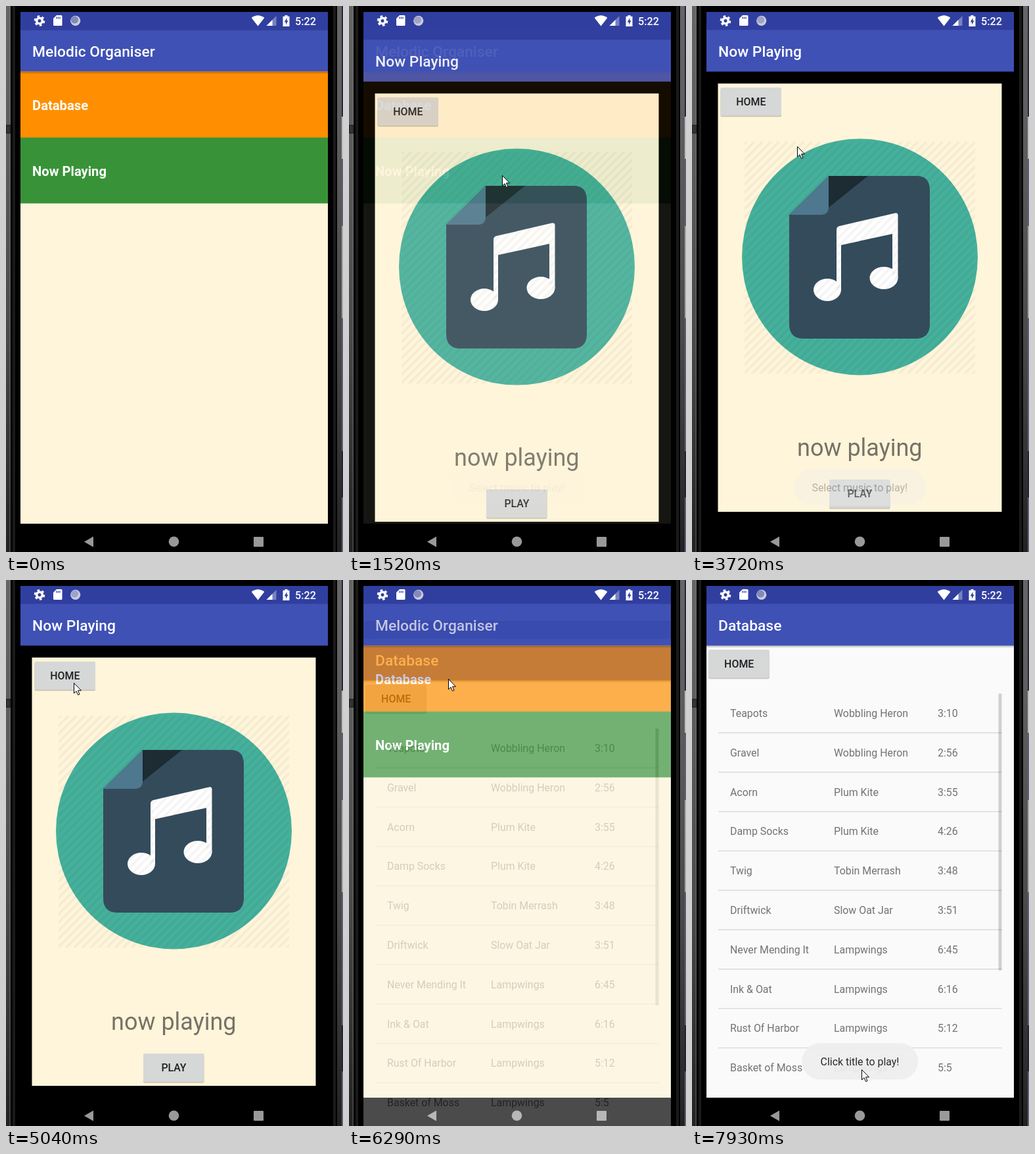
An HTML page for the animation above (8000 ms loop, 513 px wide and 829 px high).

```html
<!DOCTYPE html>
<html lang="en">
<head>
<meta charset="utf-8">
<title>Music app</title>
<style>
  html, body { margin: 0; width: 100%; height: 100%; overflow: hidden; background: #000; }
  svg { display: block; font-family: Roboto, sans-serif; }
  .title { font-size: 22.8px; font-weight: 500; fill: #fff; }
  .item { font-size: 20.2px; font-weight: 700; fill: #fff; }
  .label { font-size: 15.9px; font-weight: 500; fill: #1d2023; text-anchor: middle; }
  .row { font-size: 15.9px; fill: #737373; }
  .toast { font-size: 15.9px; fill: #2a2a2a; text-anchor: middle; }
</style>
</head>
<body>
<svg width="513" height="829" viewBox="0 0 513 829">
  <defs>
    <linearGradient id="edge" x1="0" y1="0" x2="0" y2="1">
      <stop offset="0" stop-color="#666"/>
      <stop offset=".3" stop-color="#5a5a5a"/>
      <stop offset=".6" stop-color="#4a4a4a"/>
      <stop offset="1" stop-color="#222"/>
    </linearGradient>
    <linearGradient id="shade" x1="0" y1="0" x2="0" y2="1">
      <stop offset="0" stop-opacity=".28"/>
      <stop offset="1" stop-opacity="0"/>
    </linearGradient>
    <pattern id="hatch" width="8.8" height="8.8" patternUnits="userSpaceOnUse" patternTransform="rotate(45)">
      <rect width="3.6" height="8.8" fill-opacity=".04"/>
    </pattern>
    <g id="bars">
      <rect x="22" y="9" width="468" height="27.5" fill="#303f9f"/>
      <rect x="22" y="36.3" width="468" height="63.3" fill="#3f51b5"/>
      <rect x="22" y="786" width="468" height="43"/>
    </g>
  </defs>

  <rect width="513" height="829"/>
  <g id="frame">
    <rect width="7" height="829" fill="url(#edge)"/>
    <rect x="5" width="2" height="829" fill="#777" opacity=".35"/>
    <rect x="10" width="4" height="829" fill="#1a1a1a"/>
    <rect y="181" width="7" height="12" fill="#333" stroke="#161616"/>
    <rect x="498" width="4" height="829" fill="#1a1a1a"/>
    <rect x="504" width="7" height="829" fill="url(#edge)"/>
    <rect x="511" width="2" height="829" fill="#5f5c78"/>
    <rect x="511" width="2" height="168" fill="#2b2540"/>
    <rect x="511" y="168" width="2" height="64" fill="#b9b9c0"/>
    <rect x="511" y="334" width="2" height="140" fill="#a5a39f"/>
    <rect x="511" y="676" width="2" height="70" fill="#23213a"/>
  </g>

  <g id="main">
    <rect x="22" y="99" width="468" height="688" fill="#fff5da"/>
    <use href="#bars"/>
    <rect x="22" y="99.5" width="468" height="100.5" fill="#ff8f00"/>
    <rect x="22" y="199.7" width="468" height="100" fill="#389338"/>
    <rect x="22" y="99.5" width="468" height="4" fill="url(#shade)"/>
    <text class="title" x="40" y="77">Melodic Organiser</text>
    <text class="item" x="40" y="158">Database</text>
    <text class="item" x="40" y="258">Now Playing</text>
  </g>

  <g id="play">
    <rect x="22" y="99" width="468" height="730"/>
    <use href="#bars"/>
    <text class="title" x="40" y="77">Now Playing</text>
    <rect x="39.5" y="117.7" width="432" height="650.3" fill="#fff5da"/>
    <circle cx="255.5" cy="381" r="179.5" fill="#45b09b"/>
    <rect x="80" y="206" width="351" height="352" fill="url(#hatch)"/>
    <path d="M208 258H342Q362 258 362 280V483Q362 505 340 505H170Q148 505 148 483V317Z" fill="#344b5b"/>
    <path d="M208 258H268L208 306Z" fill="#1d2b32"/>
    <path d="M208 258V305Q208 317 196 317H148Z" fill="#4e788e"/>
    <g id="note">
      <path d="M220 340Q220 335 225 334L309 314.500Q313.500 313.500 313.500 318V414H305V346L227 363V432H220Z"/>
      <ellipse cx="206" cy="431" rx="21" ry="17"/>
      <ellipse cx="292" cy="413" rx="21.500" ry="17"/>
    </g>
    <text x="160" y="683" font-size="36" fill="#767268">now playing</text>
  </g>

  <use id="main2" href="#main"/>

  <g id="list">
    <rect x="22" y="99" width="468" height="730" fill="#fafafa"/>
    <g id="rows"></g>
    <rect id="thumb" x="466.5" y="172.500" width="5" height="420"/>
    <use href="#bars"/>
    <rect x="22" y="99.5" width="468" height="4" fill="url(#shade)"/>
    <text class="title" x="40" y="77">Database</text>
  </g>

  <g id="status" fill="#fff">
    <circle cx="51" cy="22.500" r="4.300" fill="none" stroke="#fff" stroke-width="3.600"/>
    <circle cx="51" cy="22.500" r="7" fill="none" stroke="#fff" stroke-width="2.600" stroke-dasharray="3.660"/>
    <path d="M77 14H84Q85.500 14 85.500 15.500V28.500Q85.500 30 84 30H73.500Q72 30 72 28.500V19Z"/>
    <path d="M77 16.500V19.500M79.500 16.500V19.500M82 16.500V19.500" stroke="#303f9f" stroke-width="1.300"/>
    <circle cx="105.700" cy="22.300" r="7.600" fill="#c9cbe0"/>
    <circle id="disc" cx="104.500" cy="21" r="5.600" fill="#8389b8"/>
    <path d="M383.500 30.500L373.700 18Q383.500 10.500 393.300 18Z"/>
    <path d="M411.500 15V30H396.500Z" opacity=".35"/>
    <path d="M405.500 21V30H396.500Z"/>
    <path d="M424.500 14H428.500V15.700H431.500V31H421.500V15.700H424.500Z"/>
    <path d="M427.500 18L423.700 24.500H426V28.500L429.500 22.300H427.500Z" fill="#303f9f"/>
    <text x="440" y="28.700" font-size="16.200" font-weight="500">5:22</text>
  </g>
  <g fill="#fff" opacity=".6">
    <path d="M119 813.500L133 805.500V821.500Z"/>
    <circle cx="255.500" cy="813.300" r="7.800"/>
    <rect x="377" y="806" width="15" height="15" rx="1"/>
  </g>

  <g id="toast1">
    <rect x="154.500" y="703" width="202" height="55.500" rx="27.500" fill="#eee" fill-opacity=".93"/>
    <text class="toast" x="255.300" y="737">Select music to play!</text>
  </g>
  <g id="toast2">
    <rect x="167.500" y="703" width="176.500" height="55.500" rx="27.500" fill="#eee" fill-opacity=".93"/>
    <text class="toast" x="255.500" y="737">Click title to play!</text>
  </g>
  <path id="cursor" d="M.5.5V16L4 12.700L6.600 18.500L9 17.500L6.500 11.800H11.500Z" fill="#fff" stroke="#000"/>
</svg>

<script>
const LOOP = 8000;
const $ = id => document.getElementById(id);

// Bursts of screen updates: first, last, count
const bursts = [
  [0, 0, 1], [590, 1140, 8], [1520, 1990, 7], [2140, 2940, 11],
  [3030, 3790, 11], [3870, 4650, 11], [4740, 4740, 1], [4890, 5350, 7],
  [5590, 5830, 4], [6290, 6680, 6], [6990, 7770, 11], [7850, 7930, 2]
];

// Pointer path: time, x, y
const path = [
  [590, 486, 489], [1140, 233, 257], [2065, 233, 257], [2300, 262, 420],
  [2600, 309, 690], [2750, 300, 770], [2940, 272, 735], [3250, 240, 560],
  [3500, 205, 330], [3720, 159, 210], [3790, 139, 195], [4650, 109, 168],
  [4740, 103, 156], [4967, 103, 156], [5190, 192, 153], [5515, 192, 153],
  [5830, 151, 150], [6915, 151, 150], [7400, 353, 560], [7770, 300, 735],
  [7930, 258, 743]
];

const songs = [
  ['Teapots', 'Wobbling Heron', '3:10'],
  ['Gravel', 'Wobbling Heron', '2:56'],
  ['Acorn', 'Plum Kite', '3:55'],
  ['Damp Socks', 'Plum Kite', '4:26'],
  ['Twig', 'Tobin Merrash', '3:48'],
  ['Driftwick', 'Slow Oat Jar', '3:51'],
  ['Never Mending It', 'Lampwings', '6:45'],
  ['Ink & Oat', 'Lampwings', '6:16'],
  ['Rust Of Harbor', 'Lampwings', '5:12'],
  ['Basket of Moss', 'Lampwings', '5:5']
];

function add(parent, tag, attrs, text = '') {
  const el = document.createElementNS('http://www.w3.org/2000/svg', tag);
  for (const k in attrs) el.setAttribute(k, attrs[k]);
  el.textContent = text;
  parent.append(el);
  return el;
}

function button(parent, x, y, text) {
  const box = { x, width: 92.5, height: 43, rx: 2 };
  add(parent, 'rect', { ...box, y: y + 1.5, 'fill-opacity': .22 });
  add(parent, 'rect', { ...box, y, fill: '#d6d7d7' });
  add(parent, 'text', { class: 'label', x: x + 46.4, y: y + 27.3 }, text);
}

songs.forEach((song, i) => {
  const y = 202.3 + i * 59.8;
  song.forEach((s, c) => add($('rows'), 'text', { class: 'row', x: 58 + c * 158, y: y + 5.7 }, s));
  if (i < 9) add($('rows'), 'rect', { x: 40, y: y + 29, width: 431.5, height: 1.4, fill: '#d9d9d9' });
});
button($('list'), 25.3, 105.7, 'HOME');
button($('play'), 43.5, 123.7, 'HOME');
button($('play'), 209, 719, 'PLAY');
$('note').setAttribute('fill', '#fff');
add($('note'), 'path', {
  d: $('note').querySelector('path').getAttribute('d'), fill: 'url(#hatch)'
});
$('note').querySelectorAll('ellipse').forEach(e => {
  const copy = e.cloneNode();
  copy.setAttribute('fill', 'url(#hatch)');
  $('note').append(copy);
});

const clamp = v => Math.max(0, Math.min(1, v));
const decel = (v, power) => 1 - (1 - clamp(v)) ** power;

function snap(t) {
  const [a, b, n] = bursts.findLast(s => s[0] <= t);
  if (n === 1) return a;
  const step = (b - a) / (n - 1);
  return a + step * Math.min(n - 1, Math.floor((t - a) / step + 1e-6));
}

// New window slides up while it fades in
function enter(id, t, start) {
  const shift = 68 * (1 - decel((t - start) / 350, 5));
  $(id).setAttribute('opacity', decel((t - start) / 200, 4));
  $(id).setAttribute('transform', `translate(0 ${shift < .3 ? 0 : shift})`);
}

function pointer(t) {
  const i = path.findIndex(p => p[0] >= t);
  if (i < 1) return i < 0 ? path.at(-1).slice(1) : path[0].slice(1);
  const [a, b] = [path[i - 1], path[i]];
  const f = (t - a[0]) / (b[0] - a[0]);
  return [1, 2].map(k => Math.round(a[k] + (b[k] - a[k]) * f));
}

function draw(time) {
  const t = snap(time);
  enter('play', t, 1429);
  enter('main2', t, 5058);
  enter('list', t, 6273);
  $('toast1').setAttribute('opacity', decel((t - 1510) / 400, 2) * (1 - clamp((t - 3305) / 500) ** 2));
  $('toast2').setAttribute('opacity', decel((t - 6330) / 350, 2));
  $('thumb').setAttribute('opacity', .26 - .09 * clamp((t - 7770) / 160));
  $('disc').setAttribute('opacity', t > 1429 && t < 5058 ? .6 : 1);
  $('cursor').setAttribute('opacity', t < 590 ? 0 : 1);
  $('cursor').setAttribute('transform', `translate(${pointer(t)})`);
}

function tick() {
  draw(performance.now() % LOOP);
  requestAnimationFrame(tick);
}
tick();
</script>
</body>
</html>
```
